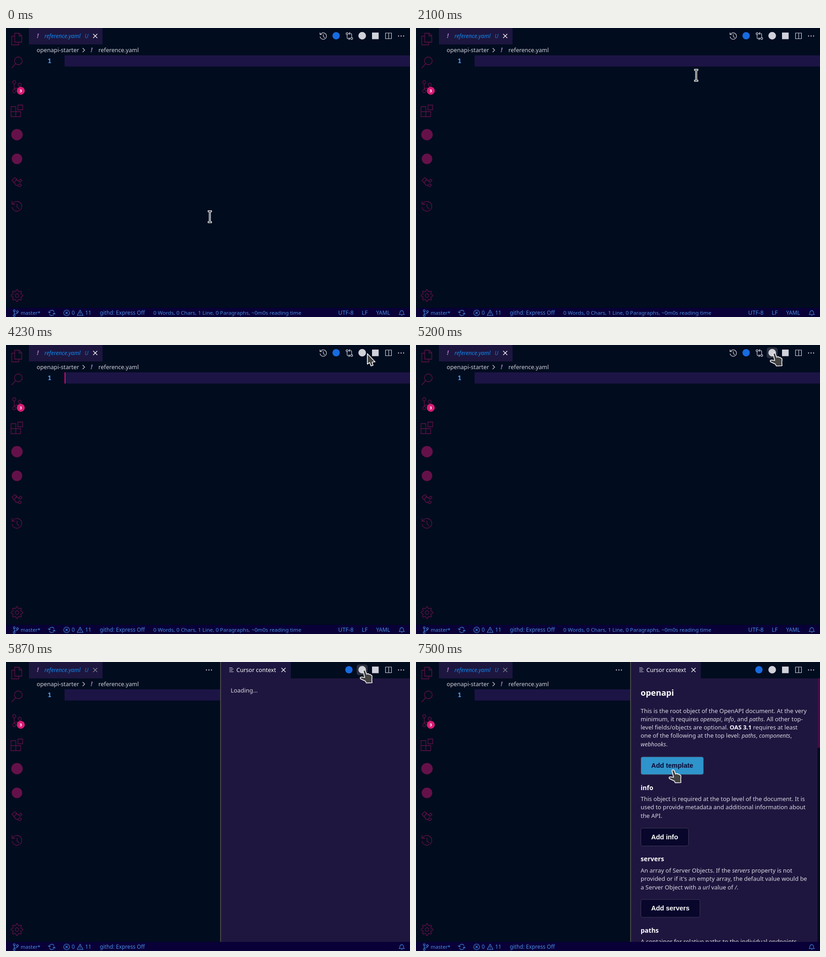
These frames come from a looping animation (883 px wide and 634 px high, 8 s). An HTML page:

```html
<!DOCTYPE html>
<html lang="en">
<head>
<meta charset="utf-8">
<title>Cursor context</title>
<style>
html, body { margin: 0; width: 100%; height: 100%; overflow: hidden; background: #010c1f; }
svg { display: block; font: 12.7px "Noto Sans", "Open Sans", sans-serif; fill: #d0d1d9; }
text { white-space: pre; }
.line { fill: none; stroke-width: 1.3; }
.side { stroke: #651149; }
.tool { stroke: #d0d1d9; stroke-width: 1.2; }
.status { fill: #4a8ee2; font-size: 11.8px; }
.status .line { stroke: #4a8ee2; stroke-width: 1.1; }
.bold { font-weight: 700; }
.italic { font-style: italic; }
.body { font-size: 12.9px; fill: #d8d8e0; }
.body .italic { font-size: 12.5px; }
.head { font-size: 14px; font-weight: 700; fill: #fff; }
.button rect { fill: #08062b; stroke: #3b3854; }
.button text { font: 700 14.5px "Liberation Sans", Arial, sans-serif; fill: #fff; }
.button.hot rect { fill: #2f94cb; }
.button.hot text { fill: #0a0a35; }
.cursor { fill: #434343; stroke: #fff; stroke-width: 1.6; stroke-linejoin: round; }
</style>
</head>
<body>
<svg width="883" height="634" viewBox="0 0 883 634">
  <defs>
    <path id="history" d="M-9.5-5A10.7 10.7 0 1 1-10.7 2M-11-11.5v7h7M0-5.5V1.5L5 6"/>
    <path id="close" d="M-4.5-4.5 4.5 4.5M4.5-4.5-4.5 4.5"/>
    <g id="dots" fill="#d0d1d9"><circle cx="-5.5" r="1.2"/><circle r="1.2"/><circle cx="5.5" r="1.2"/></g>
  </defs>

  <!-- activity bar -->
  <g class="line side">
    <path d="M19 31V11.5h10l5.500 5.500v14zM28.500 11.500v6h6M19 18h-6.500v19H28v-6"/>
    <circle cx="27" cy="72" r="8.500"/><path d="M21 78 12.500 88"/>
    <circle cx="18" cy="119" r="3.500"/><circle cx="18" cy="138.500" r="3.500"/><circle cx="30" cy="124.500" r="3.500"/>
    <path d="M18 122.500V135M30 128q0 4-5 4h-3q-4 0-4 3"/>
    <path d="M11 172.500h10.500v22H11zM11 183.500h21v11H21.500M26 169h10.500v10.500H26z"/>
    <path d="M13 334l6-6 5 4-7 7zM21 332l4 3h4M17 338l5 7h5M29 334l3-2.500 3 3-4 4-3-2.500zM27 344l3-2.500 4 3-4 4-4-2z"/>
    <use href="#history" x="24" y="391"/>
    <path id="gear"/><circle cx="24" cy="587" r="4"/>
  </g>
  <g fill="#651149"><circle cx="24" cy="234" r="12.500"/><circle cx="24" cy="287" r="11.500"/></g>
  <circle cx="32.300" cy="137.700" r="8.700" fill="#d91c76"/>
  <text x="32.300" y="141.300" text-anchor="middle" class="bold" font-size="9.500" style="fill:#fff">3</text>

  <!-- editor -->
  <path d="M50 0h161v36H50z" fill="#1d163f"/>
  <text x="67.500" y="22" class="bold italic" font-size="14" fill="#a074c4">!</text>
  <text x="84" y="21.500" class="italic" font-size="12.100" fill="#0d8bf2">reference.yaml</text>
  <text x="172" y="21.500" class="italic" font-size="12" fill="#0d7ddb">U</text>
  <use id="tabClose" href="#close" x="195" y="17.500" class="line"/>
  <text x="67" y="52.500">openapi-starter</text>
  <path d="M167.500 44l4.500 4.500-4.500 4.500" class="line tool"/>
  <text x="185" y="53" class="bold italic" font-size="14" fill="#a074c4">!</text>
  <text x="202" y="52.500" font-size="12.600">reference.yaml</text>
  <path d="M128 60h755v24.500H128z" fill="#1c1445"/>
  <text x="91" y="77" class="bold" style="font-family:'Noto Sans Mono',monospace" font-size="14" fill="#569ce4">1</text>
  <path id="caret" d="M128 60h2v24.500h-2z" fill="#dd1176"/>

  <!-- status bar -->
  <g class="status">
    <path d="M0 614h883v20H0z" fill="#090038"/>
    <g class="line">
      <circle cx="18" cy="620" r="2"/><circle cx="18" cy="630.500" r="2"/><circle cx="25" cy="622" r="2"/>
      <path d="M18 622v6.500M25 624q0 3-4 3-3 0-3 1.500"/>
      <path d="M94.500 624a5.500 5.500 0 0 1 10.500-1.500M105.500 626A5.500 5.500 0 0 1 95 627.500M92 622l2.500 3 3-2M108 628l-2.500-3-3 2"/>
      <circle cx="132.500" cy="625" r="6.300"/><path d="M130 622.500l5 5M135 622.500l-5 5"/>
      <path d="M162 619l6.300 11.500h-12.600zM162 623v4M162 628.300v1.200"/>
      <path d="M859.500 628.500q1.500-1 1.500-4.500a3.900 3.900 0 0 1 7.800 0q0 3.500 1.500 4.500zM863.500 630.500h3"/>
    </g>
    <text x="32" y="629.300" font-size="11.200">master*</text>
    <text x="143.500" y="629.300">0</text>
    <text x="173" y="629.300">11</text>
    <text x="205" y="629.300">githd: Express Off</text>
    <g id="fileStatus">
      <text x="322" y="629.300" style="font-size:11.600px">0 Words, 0 Chars, 1 Line, 0 Paragraphs, ~0m0s reading time</text>
      <text x="726" y="629.300" style="font-size:12.500px">UTF-8</text>
      <text x="777.500" y="629.300" style="font-size:12.500px">LF</text>
      <text x="809" y="629.300">YAML</text>
    </g>
  </g>

  <!-- right group -->
  <g id="split">
    <use href="#dots" x="443.500" y="17.500"/>
    <path d="M469 0h414v614H469z" fill="#010c1f"/>
    <path d="M470 0h152.500v36H470z" fill="#1d163f"/>
    <path d="M488 12.500h7M488 15.500h9.500M488 18.500h7M488 21.500h9.500" class="line tool"/>
    <text x="503.500" y="21.500" font-size="12.540" fill="#fff">Cursor context</text>
    <use href="#close" x="606.500" y="17.500" class="line" stroke="#fff"/>
    <path id="panel" d="M470 36h413v578H470z" fill="#1f163f"/>
    <text id="loading" x="491" y="67" class="body">Loading...</text>
    <svg id="doc" width="883" height="614">
      <path d="M877.500 36H883v578h-5.500z" fill="#010c1f"/>
      <path d="M877.500 36H883v152h-5.500z" fill="#4b0b47"/>
      <text x="491" y="73.500" class="bold" font-size="18" fill="#fff">openapi</text>
    </svg>
    <path d="M468.200 0h1.600v614h-1.600z" fill="#5a5b53"/>
  </g>

  <!-- toolbar -->
  <rect id="hover" y="5.500" width="24" height="23.500" rx="5" fill="#2b303f"/>
  <g id="fileTools" class="line tool">
    <use href="#history" transform="translate(693.500 17.500) scale(.66)" stroke-width="1.800"/>
    <circle cx="745.500" cy="12.500" r="2.200"/><circle cx="755.500" cy="23" r="2.200"/>
    <path d="M745.500 15v6q0 2.500 2.500 2.500h3M749 21l2.500 2.500-2.500 2.500M755.500 20.500v-6q0-2.500-2.500-2.500h-3M752 9.500 749.500 12l2.500 2.500"/>
  </g>
  <circle id="sync" cy="17" r="8" fill="#176be0"/>
  <circle cx="778.500" cy="17" r="8.300"/>
  <path d="M800 10h14.500v14.500H800z"/>
  <path d="M829.500 11h13v12.500h-13zM836.500 11v12.500" class="line tool"/>
  <use href="#dots" x="863.500" y="17.500"/>

  <!-- pointers -->
  <path id="arrow" class="cursor" d="M0 1V24L5 20.500 8 28 12.500 26.500 10.500 19.500 17 19z"/>
  <path id="hand" class="cursor" d="M-4 2.500Q-2-1 .5 1.500L4 10Q7.500 7 9 10.500 12 9 13 12 15.500 11.500 15.500 15L15 22 15.500 28.500 3 29 1 25-9.500 20Q-12 16-7 16L-.5 17z"/>
  <g id="beam" fill="none">
    <path d="M-4.500-12h9M0-12V12M-4.500 12h9" stroke="#fff" stroke-width="4"/>
    <path d="M-3.500-12h7M0-12V12M-3.500 12h7" stroke="#222" stroke-width="1.300"/>
  </g>
</svg>
<script>
const LOOP = 8000, SPLIT = 5430, LOADING = 5870, READY = 5970;
const $ = id => document.getElementById(id);
const show = (id, on) => $(id).style.display = on ? "" : "none";

const teeth = Array.from({ length: 32 }, (_, i) => {
  const r = i % 4 < 2 ? 12.8 : 9.3, a = (i - .5) * Math.PI / 16;
  return `${24 + r * Math.cos(a)} ${587 + r * Math.sin(a)}`;
});
$("gear").setAttribute("d", `M${teeth.join("L")}z`);

// _italic_ and *bold* marks inside the documentation text
const markup = s => s
  .replace(/_(.+?)_/g, '<tspan class="italic">$1</tspan>')
  .replace(/\*(.+?)\*/g, '<tspan class="bold" fill="#fff">$1</tspan>');
const lines = (y, ...rows) => rows.map((row, i) =>
  `<text class="body" x="491" y="${y + i * 18.25}">${markup(row)}</text>`).join("");
const head = (y, s) => `<text class="head" x="491" y="${y}">${s}</text>`;
const button = (y, w, s, id = "") => `<g class="button" id="${id}">
  <rect x="491.5" y="${y}" width="${w}" height="39" rx="4"/><text x="514" y="${y + 24}">${s}</text></g>`;

$("doc").innerHTML +=
  lines(111.5,
    "This is the root object of the OpenAPI document. At the very",
    "minimum, it requires _openapi_, _info_, and _paths_. All other top-",
    "level fields/objects are optional. *OAS 3.1* requires at least",
    "one of the following at the top level: _paths_, _components_,",
    "_webhooks_.") +
  button(208, 137, "Add template", "template") +
  head(280.5, "info") +
  lines(305,
    "This object is required at the top level of the document. It is",
    "used to provide metadata and additional information about",
    "the API.") +
  button(364.5, 104, "Add info") +
  head(437, "servers") +
  lines(462,
    "An array of Server Objects. If the _servers_ property is not",
    "provided or if it's an empty array, the default value would be",
    "a Server Object with a _url_ value of _/_.") +
  button(521, 129, "Add servers") +
  head(594, "paths") +
  lines(618, "A container for relative paths to the individual endpoints.");

// pointer path: time, x, y
const path = [
  [0, 445.5, 414], [300, 445.5, 414], [530, 340, 230], [770, 235, 46], [1129, 235, 46],
  [1130, 236.5, 67.5], [1429, 236.5, 67.5], [1430, 235.5, 68], [1540, 235.5, 68],
  [1680, 300, 125], [1850, 425, 168], [1980, 530, 148], [2100, 612, 104], [2370, 717, 64],
  [2430, 725, 58], [2750, 765, 30], [3200, 793, 20], [3300, 789.8, 18], [4230, 789.8, 18],
  [4370, 784.5, 17], [6660, 784.5, 17], [6850, 735, 70], [7150, 620, 185],
  [7350, 572, 226], [7500, 563.5, 236], [LOOP, 563.5, 236]
];
function pointerAt(t) {
  const i = path.findIndex(k => k[0] > t), a = path[i - 1], b = path[i];
  const p = (t - a[0]) / (b[0] - a[0]);
  return [a[1] + (b[1] - a[1]) * p, a[2] + (b[2] - a[2]) * p];
}

function draw(t) {
  const split = t >= SPLIT, ready = t >= READY;
  show("split", split);
  show("panel", t >= LOADING);
  show("loading", t >= LOADING && !ready);
  show("doc", ready);
  show("fileStatus", !split);
  show("fileTools", !split);
  $("sync").setAttribute("cx", split ? 749.5 : 721.5);
  $("tabClose").setAttribute("stroke", split ? "#7f8490" : "#fff");
  show("caret", t >= 1230 && !split && (t - 1230) % 1000 < 500);

  const [x, y] = pointerAt(t);
  const slots = split ? [749.5, 778.5, 807, 836] : [693.5, 721.5, 750, 778.5, 807, 836];
  const icon = y > 6 && y < 29 && slots.find(s => Math.abs(x - s) < 11);
  show("hover", icon);
  if (icon) $("hover").setAttribute("x", icon - 12);

  const onButton = ready && x > 491 && x < 629 && y > 208 && y < 247;
  $("template").classList.toggle("hot", onButton);
  const shape = icon || onButton ? "hand" : y > 59 && !split ? "beam" : "arrow";
  for (const id of ["arrow", "hand", "beam"]) show(id, id === shape);
  $(shape).setAttribute("transform", `translate(${x} ${y})`);
}

const start = performance.now();
function tick() {
  draw((performance.now() - start) % LOOP);
  requestAnimationFrame(tick);
}
tick();
</script>
</body>
</html>
```
